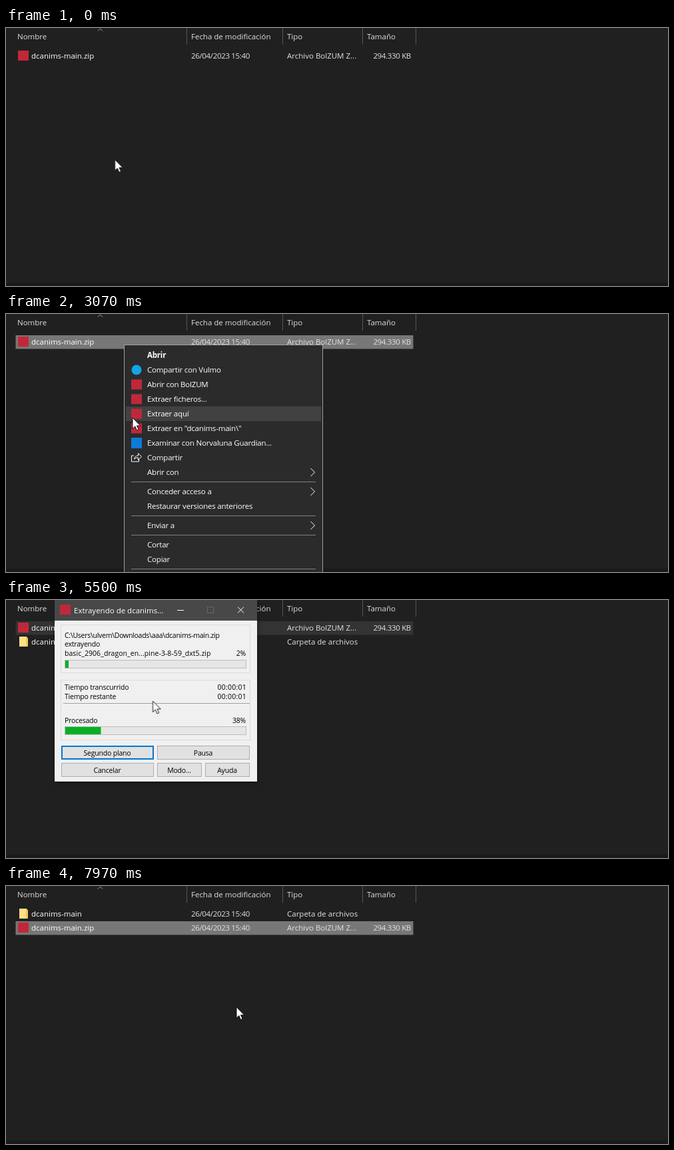
Recreate the animation shown at these times as an HTML page. Size 994 by 388 pixels, loop 8 s.

```html
<!DOCTYPE html>
<html lang="es">
<head>
<meta charset="utf-8">
<title>Extraer un archivo</title>
<style>
html, body { margin: 0; width: 100%; height: 100%; overflow: hidden; background: #202020; }
svg { display: block; width: 994px; height: 388px; font: 11.5px "Open Sans", "Noto Sans", sans-serif; fill: #fff; }
text { white-space: pre; }
.head { fill: #dedede; }
.cell { fill: #e2e2e2; }
.num { letter-spacing: -.34px; }
#menu text { letter-spacing: -.2px; }
.line { fill: none; stroke: #fff; }
.body text { font-size: 10.5px; letter-spacing: -.2px; fill: #000; }
.body .path { letter-spacing: -.27px; }
.body .file { letter-spacing: .05px; }
.body .clock { letter-spacing: .25px; }
.mid { text-anchor: middle; }
.end { text-anchor: end; }

#cursor, #menu, #hover, #dialog, #folder, #zip, #select { animation: 8s linear infinite; }
#cursor { animation-name: cursor; animation-timing-function: ease-in-out; }
#menu { animation-name: menu; }
#hover { animation-name: hover; animation-timing-function: step-end; }
#dialog { animation-name: dialog; transform-origin: 152px 137px; filter: drop-shadow(1px 2px 3px #0006); }
#folder { animation-name: folder; animation-timing-function: step-end; }
#zip { animation-name: zip; animation-timing-function: step-end; }
#select { animation-name: select; }

@keyframes cursor {
  0%, .375% { transform: translate(163.5px, 198px); }
  6.25%, 9.6% { transform: translate(182px, 50px); }
  14.1%, 30% { transform: translate(177.5px, 47px); }
  33.75% { transform: translate(200px, 185px); }
  36.6%, 38.4% { transform: translate(190px, 156px); }
  42% { transform: translate(250px, 156px); }
  45.9%, 72.9% { transform: translate(220.5px, 152px); }
  77.5%, 79% { transform: translate(192px, 11.5px); }
  82.9%, 93.75% { transform: translate(194px, 35.5px); }
  99.2%, 100% { transform: translate(346px, 182px); }
}
@keyframes menu {
  0%, 22.9% { opacity: 0; }
  25.6%, 52.6% { opacity: 1; }
  54.4%, 100% { opacity: 0; }
}
@keyframes hover {
  0% { opacity: 0; transform: none; }
  30.6% { opacity: 1; transform: none; animation-timing-function: steps(6); }
  33.75% { opacity: 1; transform: translateY(132px); }
  34.6% { opacity: 1; transform: translateY(110px); }
  35.6%, 100% { opacity: 1; transform: translateY(88px); }
}
@keyframes dialog {
  0%, 55.25% { opacity: 0; transform: scale(.95); }
  57.625% { opacity: 1; transform: none; }
  79% { opacity: 1; transform: none; animation-timing-function: ease-in-out; }
  82.9%, 95% { opacity: 1; transform: translate(2px, 24px); }
  97%, 100% { opacity: 0; transform: translate(2px, 24px) scale(.95); }
}
@keyframes folder {
  0% { opacity: 0; transform: translateY(21px); }
  63.1% { opacity: 1; transform: translateY(21px); }
  77.5%, 100% { opacity: 1; transform: none; }
}
@keyframes zip {
  0% { transform: none; }
  77.5%, 100% { transform: translateY(21px); }
}
@keyframes select {
  0%, 4.8% { fill: #4d4d4d00; }
  5.2%, 9.6% { fill: #4d4d4d; }
  11%, 52.6% { fill: #777; }
  53.4%, 96.2% { fill: #333; }
  96.8%, 100% { fill: #777; }
}
</style>
</head>
<body>
<svg id="stage" viewBox="0 0 994 388"></svg>
<script>
const text = (x, y, str, cls = '', id = '') =>
  `<text x="${x}" y="${y}" class="${cls}" id="${id}">${str}</text>`;
const rect = (x, y, w, h, fill, more = '') =>
  `<rect x="${x}" y="${y}" width="${w}" height="${h}" fill="${fill}" ${more}/>`;
const path = (d, more = 'class="line"') => `<path d="${d}" ${more}/>`;
const archive = (x, y) => rect(x, y, 16, 15, '#c0283a');

// File list
const header = [[17, 'Nombre'], [278, 'Fecha de modificación'], [422, 'Tipo'], [542, 'Tamaño']]
  .map(([x, str]) => text(x, 17, str, 'head')).join('')
  + [271, 415, 535, 615].map(x => rect(x, 0, 1, 25, '#565656')).join('')
  + path('M138 4.5l3.5-3.5 3.5 3.5', 'fill="none" stroke="#a0a0a0"');

const cells = (name, type, size) => text(38, 46, name) + text(278, 46, '26/04/2023 15:40', 'cell num')
  + text(422, 46, type, 'cell') + text(608, 46, size, 'cell num end');

const list = `<g id="zip">${rect(14.5, 32, 597, 20.5, 'none', 'id="select"')}${archive(18, 34)}
    ${cells('dcanims-main.zip', 'Archivo BolZUM Z...', '294.330 KB')}</g>
  <g id="folder">${path('M20 34h10l3 3v12h-13z', 'fill="#ffe08a"')}${path('M30 34h1l2 3v12h-3z', 'fill="#f4c84e"')}
    ${cells('dcanims-main', 'Carpeta de archivos', '')}</g>`;

// Context menu: [center y, label, icon]
const icons = {
  archive: y => archive(188, y - 7.5),
  call: y => `<circle cx="196" cy="${y}" r="7.5" fill="#12a5e8"/>`,
  shield: y => rect(188, y - 8, 16, 16, '#0f7ad8'),
  share: y => path(`M192 ${y - 3}h-3.500v9h11v-3M192.500 ${y + 2}q1-5 6-5v-3.500l5 5-5 5v-3.500q-4 0-6 2z`),
  more: y => path(`M457.500 ${y - 6}l6 6-6 6`),
};
const items = [
  [62, 'Abrir'], [84, 'Compartir con Vulmo', 'call'], [106, 'Abrir con BolZUM', 'archive'],
  [128, 'Extraer ficheros...', 'archive'], [150, 'Extraer aquí', 'archive'],
  [172, 'Extraer en "dcanims-main\\"', 'archive'],
  [194, 'Examinar con Norvaluna Guardian...', 'shield'], [216, 'Compartir', 'share'],
  [238, 'Abrir con', 'more'], [267, 'Conceder acceso a', 'more'], [289, 'Restaurar versiones anteriores'],
  [318, 'Enviar a', 'more'], [347, 'Cortar'], [369, 'Copiar'],
];
const menu = `<g id="menu">${rect(177.5, 46.5, 298, 360, '#2b2b2b', 'stroke="#a0a0a0"')}
  ${rect(180, 51, 293, 22, '#414141', 'id="hover"')}
  ${[252, 303, 332, 383].map(y => rect(188, y, 277, 1, '#808080')).join('')}
  ${items.map(([y, label, icon], i) => `<g ${i ? '' : 'font-weight="700"'}>${text(212, y + 4, label)}</g>`
    + (icon ? icons[icon](y) : '')).join('')}</g>`;

// Extraction dialog
const group = (y, h) => rect(9.5, y, 284, h, 'none', 'stroke="#dcdcdc"');
const bar = (y, id) => rect(15.5, y, 272, 12, '#e6e6e6', 'stroke="#bcbcbc"')
  + rect(16, y + .5, 0, 11, '#06b025', `id="${id}"`);
const button = (x, y, w, label, main) => (main
  ? rect(x + 1, y + 1, w - 2, 19, '#e1e1e1', 'stroke="#0078d7" stroke-width="2"')
  : rect(x + .5, y + .5, w - 1, 20, '#e1e1e1', 'stroke="#adadad"'))
  + text(x + w / 2 - .5, y + 15, label, 'mid');

const dialog = `<g transform="translate(73 0)"><g id="dialog">
  ${rect(0, 0, 304, 273, '#f0f0f0')}${rect(0, 0, 304, 31, '#484848')}
  ${archive(8, 7)}${text(29, 20, 'Extrayendo de dcanims...')}
  ${path('M184 15.500h10M275 10.500l9 9m0-9l-9 9')}${path('M229.500 10.500h9v9h-9z', 'fill="none" stroke="#686868"')}
  <g class="body">
    ${group(37.5, 72)}${group(120.5, 90)}
    ${text(15, 57, 'C:\\Users\\ulvem\\Downloads\\aaa\\dcanims-main.zip', 'path')}
    ${text(15, 70, 'extrayendo')}${text(15, 84, '', 'file', 'file')}${text(287, 84, '', 'end', 'filePercent')}
    ${bar(90.5, 'fileBar')}
    ${text(15, 135, 'Tiempo transcurrido')}${text(288, 135, '', 'end clock', 'elapsed')}
    <g id="remaining">${text(15, 149, 'Tiempo restante')}${text(288, 149, '', 'end clock', 'left')}</g>
    ${rect(13, 155, 280, 1, '#a0a0a0')}
    ${text(15, 185, 'Procesado')}${text(287, 185, '', 'end', 'totalPercent')}${bar(190.5, 'totalBar')}
    ${button(10, 219, 139, 'Segundo plano', true)}${button(154, 219, 139, 'Pausa')}
    ${button(10, 245, 139, 'Cancelar')}${button(154, 245, 67, 'Modo...')}${button(226, 245, 67, 'Ayuda')}
  </g></g></g>`;

const cursor = path('M0 0v16.500l3.800-3.600 2.600 6 2.700-1.200-2.600-5.700h5.200z',
  'id="cursor" fill="#fff" stroke="#000" stroke-width=".9"');

const stage = document.getElementById('stage');
stage.innerHTML = rect(0, 0, 994, 388, '#202020') + rect(0, 383, 994, 5, '#1a1a1a')
  + header + list + menu + dialog + cursor;

// Counters
const el = id => document.getElementById(id);
const clock = s => `00:00:0${s}`;

// Piecewise linear value through [time, value] points
function track(t, points) {
  if (t <= points[0][0]) return points[0][1];
  for (let i = 1; i < points.length; i++) {
    const [t0, v0] = points[i - 1], [t1, v1] = points[i];
    if (t <= t1) return v0 + (v1 - v0) * (t - t0) / (t1 - t0);
  }
  return points[points.length - 1][1];
}

const endings = [['bre', 'pine'], ['en', 'pine'], ['hig', 'spine']];

function update(t) {
  const step = Math.min(76, Math.max(44, Math.floor(t / 100)));
  const number = Math.round(track(step * 100, [[4400, 2752], [4500, 2766], [5500, 2906], [7100, 3003], [7600, 3040]]));
  const [start, tail] = endings[step % 3];
  const n = step - 45;
  el('file').textContent = `basic_${number}_dragon_${start}...${tail}-3-8-59_dxt5.zip`;
  el('filePercent').textContent = (92 + 92 * n + 10 * n * (n - 10)) % 101 + '%';
  el('fileBar').setAttribute('width', step < 50 ? 24 : 5);

  const total = track(t, [[4600, 0], [5500, 38], [7130, 81], [7600, 100]]);
  el('totalPercent').textContent = Math.round(total) + '%';
  el('totalBar').setAttribute('width', track(t, [[4600, 0], [5500, 53.5], [7130, 201], [7600, 271]]));
  el('elapsed').textContent = clock(t < 5450 ? 0 : t < 6500 ? 1 : 2);
  el('left').textContent = clock(t < 6300 ? 1 : 0);
  el('remaining').setAttribute('visibility', t < 5450 ? 'hidden' : 'inherit');
}

let begin;
function frame(now) {
  begin ??= now;
  update((now - begin) % 8000);
  requestAnimationFrame(frame);
}
update(0);
requestAnimationFrame(frame);
</script>
</body>
</html>
```
